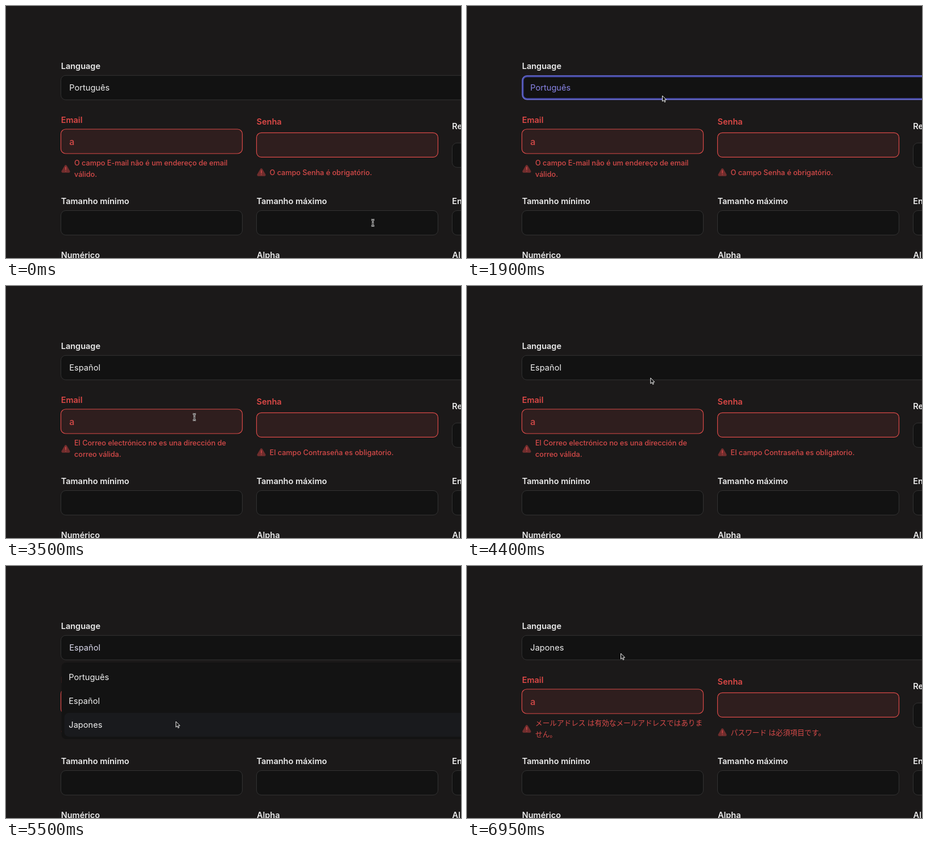
Recreate the animation shown at these times as an HTML page. Size 800x444 px, loop 7000 ms.

```html
<!DOCTYPE html>
<html lang="pt">
<head>
<meta charset="utf-8">
<title>Form language</title>
<style>
  html, body { margin: 0; width: 100%; height: 100%; overflow: hidden; background: #1b1919; }
  svg { display: block; width: 100%; height: 100%; }
  text { font-family: Inter, "Noto Sans CJK JP", "Noto Sans CJK", "Noto Sans", sans-serif; white-space: pre; }
  .label { font-size: 14.5px; font-weight: 600; fill: #ececec; }
  .value { font-size: 14.6px; fill: #f0f0f0; }
  .error { font-size: 12.65px; font-weight: 500; fill: #d64a49; }
  .bad { fill: #dc4846; }
  .typed { font-size: 16px; font-weight: 500; fill: #d64a49; }
  .field { fill: #121212; stroke: #323232; stroke-width: 1; }
  .field.bad { fill: #2f1e1e; stroke: #d94a48; stroke-width: 1.2; }
</style>
</head>
<body>
<svg id="stage" viewBox="0 0 800 444"></svg>
<script>
const LOOP = 7000, STEP = 50;
const stage = document.getElementById('stage');

function add(tag, attrs, parent = stage, content = '') {
  const el = document.createElementNS('http://www.w3.org/2000/svg', tag);
  for (const key in attrs) el.setAttribute(key, attrs[key]);
  el.textContent = content;
  parent.appendChild(el);
  return el;
}
const text = (cls, x, y, str, parent) => add('text', { class: cls, x, y }, parent, str);
const box = (cls, x, y, w, h, parent) =>
  add('rect', { class: cls, x, y, width: w, height: h, rx: 8.5 }, parent);

function warning(x, y) {
  const g = add('g', { transform: `translate(${x} ${y})` });
  add('path', { d: 'M0-4.6 L5.4 4.6 H-5.4Z', fill: '#702d2d', stroke: '#702d2d',
    'stroke-width': 4.4, 'stroke-linejoin': 'round' }, g);
  add('path', { d: 'M0-3V1.3M0 4V4.1', stroke: '#d64a49', 'stroke-width': 1.5,
    'stroke-linecap': 'round' }, g);
}

// Form
const INPUTS = [[96.5, 217], [440.5, 223.3], [784.5, 241.3], [96.5, 360.5], [440.5, 360.5], [784.5, 360.5]];
const W = 319, H = 43;
INPUTS.forEach(([x, y], i) => box(i < 2 ? 'field bad' : 'field', x, y, W, H));

[['Language', 96.7, 111.2], ['Re', 784.3, 217.2],
 ['Tamanho mínimo', 96.7, 349.3], ['Tamanho máximo', 440.5, 349.3], ['En', 784.3, 349.3],
 ['Numérico', 96.7, 444], ['Alpha', 440.9, 444], ['Al', 784.6, 444]
].forEach(([s, x, y]) => text('label', x, y, s));
text('label bad', 96.7, 206.2, 'Email');
text('label bad', 440.5, 209, 'Senha');
text('typed', 111.3, 244.8, 'a');
warning(105, 287);
warning(449, 293);
const errors = [[120, 280.8], [120, 301.4], [463.6, 297.6]].map(([x, y]) => text('error', x, y, ''));

// Language select
const select = box('field', 96.5, 122.3, 740, 43);
const ring = add('g', {});
add('rect', { x: 98, y: 123.7, width: 740, height: 40.2, rx: 7.5, fill: 'none',
  stroke: '#41459f', 'stroke-width': 3.4 }, ring);
add('rect', { x: 97.4, y: 123, width: 740, height: 41.6, rx: 8, fill: 'none',
  stroke: '#7074d6', 'stroke-width': 1.1 }, ring);
const value = text('value', 111.3, 148.9, '');

// Dropdown
const MENU = { top: 170, row: 42.2, first: 216.5 - 42.2 };
const menu = add('g', {});
add('rect', { x: 97.7, y: MENU.top, width: 740, height: 135, rx: 8, fill: '#131313' }, menu);
const hover = add('rect', { x: 102.5, width: 740, height: 42, rx: 8, fill: '#191a1d' }, menu);
const NAMES = ['Português', 'Español', 'Japones'];
NAMES.forEach((s, i) => text('value', 110.3, 200.8 + i * MENU.row, s, menu));

const MESSAGES = [
  ['O campo E-mail não é um endereço de email', 'válido.', 'O campo Senha é obrigatório.'],
  ['El Correo electrónico no es una dirección de', 'correo válida.', 'El campo Contraseña es obligatorio.'],
  ['メールアドレス は有効なメールアドレスではありま', 'せん。', 'パスワード は必須項目です。']
];

// Pointers
const arrow = add('path', { d: 'M0 0V10L2.3 7.9L3.9 11.4L5.5 10.7L4 7.4L7 7.2Z',
  fill: '#111', stroke: '#f2f2f2', 'stroke-width': 1, 'stroke-linejoin': 'round' });
const beam = add('g', {});
const beamPath = 'M-2.6-5.4Q0-5.4 0-3.8Q0-5.4 2.6-5.4M0-3.8V3.8M-2.6 5.4Q0 5.4 0 3.8Q0 5.4 2.6 5.4M-1.5 1.6H1.5';
add('path', { d: beamPath, fill: 'none', stroke: '#e6e6e6', 'stroke-width': 2.7 }, beam);
add('path', { d: beamPath, fill: 'none', stroke: '#151515', 'stroke-width': 0.9 }, beam);

// [time, x, y]
const PATH = [
  [0, 645, 382], [150, 645, 382], [800, 470, 214], [1500, 343.5, 158], [2050, 343.5, 158],
  [2600, 331.2, 230], [3850, 331.2, 230], [4500, 322.2, 157.3], [4750, 322.2, 157.3],
  [5350, 298.8, 274], [6000, 298.8, 274], [6700, 270.5, 156], [6950, 270.5, 154], [LOOP, 270.5, 154]
];
const VISITS = [
  { focus: 1800, open: 1900, pick: 2850, errors: 3150 },
  { focus: 4560, open: 4610, pick: 5420, errors: 5900 }
];

const ramp = (t, from, len) => Math.min(1, Math.max(0, (t - from) / len));
const mix = (a, b, k) => `rgb(${a.map((v, i) => Math.round(v + (b[i] - v) * k))})`;

function pointer(t) {
  const i = PATH.findIndex((p, n) => n && t <= p[0]);
  const [t0, x0, y0] = PATH[i - 1], [t1, x1, y1] = PATH[i];
  const u = ramp(t, t0, t1 - t0), k = u * u * (3 - 2 * u);
  return [x0 + (x1 - x0) * k, y0 + (y1 - y0) * k];
}

function overText(x, y) {
  const inside = (l, t, w, h) => x > l && x < l + w && y > t && y < t + h;
  return INPUTS.some(([l, t]) => inside(l, t, W, H)) || inside(120, 268, 294, 36);
}

function draw(t) {
  let lang = 0, message = 0, focus = 0, tint = 0, shown = 0;
  VISITS.forEach((v, i) => {
    const closing = v.pick + 80;
    if (t >= closing + 50) lang = i + 1;
    if (t >= v.errors) message = i + 1;
    if (t >= v.focus && t < v.pick) focus = ramp(t, v.focus, 80);
    if (t >= v.focus && t < closing + 50) tint = ramp(t, v.focus, 80) * (1 - ramp(t, v.pick, 100));
    if (t >= v.open && t < closing + 100) shown = ramp(t, v.open, 80) * (1 - ramp(t, closing, 100));
  });

  value.textContent = NAMES[lang];
  value.style.fill = mix([240, 240, 240], [138, 133, 232], tint);
  ring.setAttribute('opacity', focus);
  menu.setAttribute('opacity', shown);
  errors.forEach((el, i) => { el.textContent = MESSAGES[message][i]; });

  const [x, y] = pointer(t);
  const row = Math.floor((y - MENU.first) / MENU.row);
  hover.setAttribute('y', MENU.first + row * MENU.row);
  hover.setAttribute('opacity', row >= 0 && row < 3 ? 1 : 0);

  const useBeam = !shown && overText(x, y);
  arrow.setAttribute('transform', `translate(${x} ${y})`);
  beam.setAttribute('transform', `translate(${x} ${y + (t > 2000 ? 1 : 0)})`);
  arrow.setAttribute('opacity', useBeam ? 0 : 1);
  beam.setAttribute('opacity', useBeam ? 1 : 0);
}

const start = performance.now();
function tick() {
  const t = (performance.now() - start) % LOOP;
  draw(Math.floor(t / STEP) * STEP);
  requestAnimationFrame(tick);
}
tick();
</script>
</body>
</html>
```
